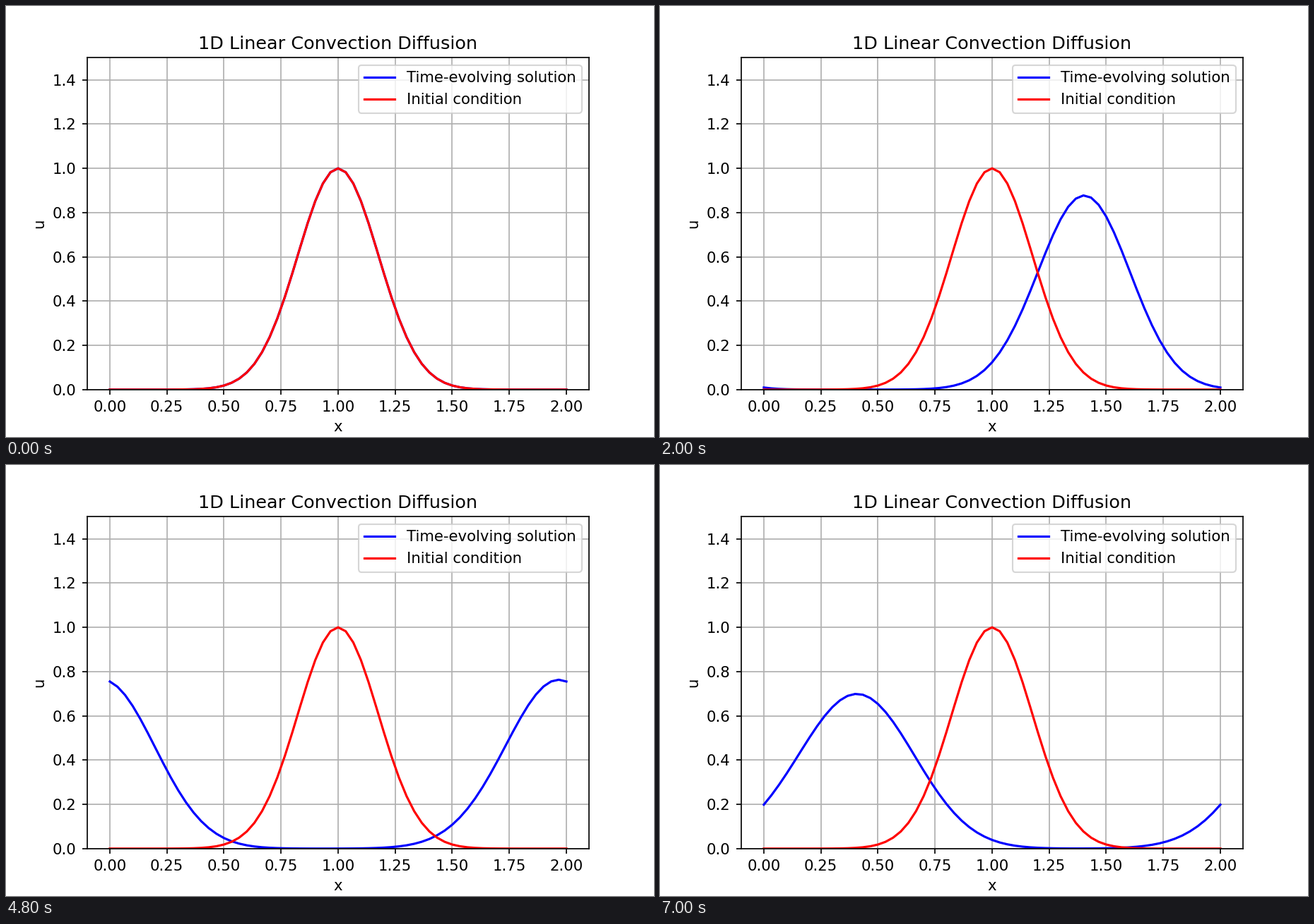
Write a matplotlib script that moves like this. It is 917 by 611 pixels and loops after 7100 ms.

```python
import numpy as np
import matplotlib.pyplot as plt
from matplotlib.animation import FuncAnimation

WIDTH, HEIGHT, DPI = 917, 611, 152.8
FRAMES, INTERVAL = 71, 100

# Convection speed, viscosity and grid
C, NU = 1.0, 0.005
NX, DT = 61, 0.02
x = np.linspace(0, 2, NX)
dx = x[1] - x[0]


def step(u):
    """Advance one time step: upwind convection, central diffusion, periodic ends."""
    core = u[:-1]
    left, right = np.roll(core, 1), np.roll(core, -1)
    new = (core - C * DT / dx * (core - left)
           + NU * DT / dx**2 * (right - 2 * core + left))
    return np.append(new, new[0])


def solve(u, count):
    states = [u]
    while len(states) < count:
        states.append(step(states[-1]))
    return states


u0 = np.exp(-16 * (x - 1) ** 2)
states = solve(u0, FRAMES)

plt.rcParams["font.family"] = "DejaVu Sans"
# The small margin keeps the pixel size from rounding down
fig, ax = plt.subplots(figsize=((WIDTH + 0.01) / DPI, (HEIGHT + 0.01) / DPI), dpi=DPI)
line, = ax.plot(x, u0, color="blue", label="Time-evolving solution")
ax.plot(x, u0, color="red", label="Initial condition")
ax.set(xlim=(-0.1, 2.1), ylim=(0, 1.5), xlabel="x", ylabel="u",
       title="1D Linear Convection Diffusion")
ax.grid(True)
ax.legend(loc="upper right")


def update(i):
    line.set_ydata(states[i])
    return line,


anim = FuncAnimation(fig, update, frames=FRAMES, interval=INTERVAL,
                     repeat=True, repeat_delay=0)
plt.show()
```
